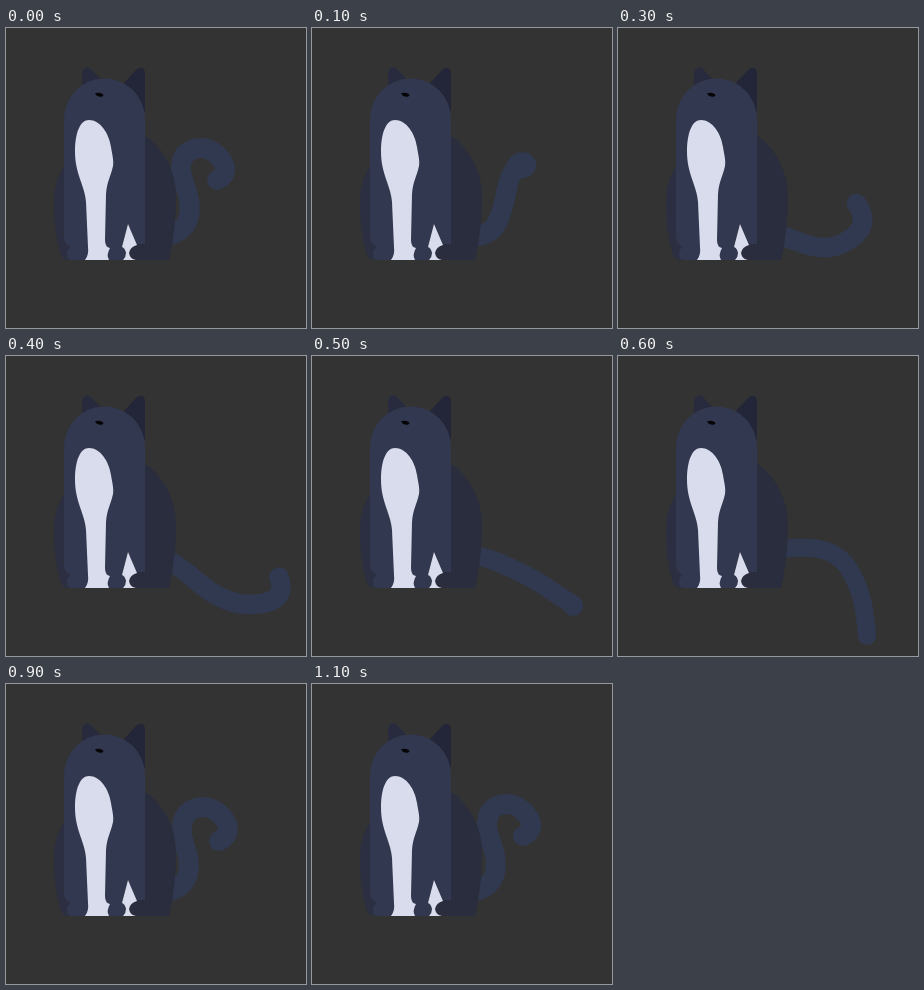
Write an HTML page without scripts that moves like this. It is 300x300 px and loops after 1300 ms.

```html
<!DOCTYPE html>
<html lang="en">
<head>
<meta charset="utf-8">
<title>Cat swishing its tail</title>
<style>
  html, body { margin: 0; width: 100%; height: 100%; overflow: hidden; background: #333; }
  svg { display: block; width: 100%; height: 100%; }
  .coat { fill: #32384f; }
  .shade { fill: #2a2d3d; }
  .white { fill: #d9dcec; }
  .tail {
    fill: none;
    stroke: #303950;
    stroke-width: 20px;
    stroke-linecap: round;
    stroke-linejoin: round;
    animation: swish 1300ms infinite;
  }
  /* Each pose moves on at ten pictures a second. */
  @keyframes swish {
    0% {
      d: path("M164 207C180 203 186 190 183 172C180 156 174 150 175 138C176 124 187 120 195 120C209 119 231 143 211 152");
      animation-timing-function: steps(2);
    }
    15.3846% {
      d: path("M160 210C172 211 182 211 191 208C203 204 211 194 215 182C218 172 219 162 217 152C215 143 210 134 204 130");
      animation-timing-function: steps(2);
    }
    30.7692% {
      d: path("M162 204C173 210 184 219 193 227C206 238 220 246 236 248C250 249 264 248 271 241C277 235 275 227 273 221");
      stroke-width: 19.5px;
      animation-timing-function: steps(2);
    }
    46.1538% {
      d: path("M160 193C172 192 183 191 193 192C209 193 222 199 231 213C240 228 244 241 246 253C247 263 249 273 249 280");
      stroke-width: 18px;
      animation-timing-function: steps(1);
    }
    53.8462% {
      d: path("M162 206C172 203 175 196 181 190C190 177 207 163 226 162C243 161 255 166 264 177C269 184 272 192 272 197");
      stroke-width: 20px;
      animation-timing-function: steps(2);
    }
    69.2308% {
      d: path("M164 207C180 203 185 190 182 173C179 160 174 152 176 141C178 128 188 123 197 123C211 122 235 146 213 157");
      animation-timing-function: steps(2);
    }
    84.6154%, 100% {
      d: path("M164 207C180 203 186 190 183 172C180 156 174 150 175 138C176 124 187 120 195 120C209 119 231 143 211 152");
    }
  }
</style>
</head>
<body>
<svg viewBox="0 0 300 300" role="img" aria-label="Sitting cat with a swishing tail">
  <path class="tail" d="M164 207C180 203 186 190 183 172C180 156 174 150 175 138C176 124 187 120 195 120C209 119 231 143 211 152"/>

  <!-- haunches -->
  <path class="shade" d="M138 107C158 120 170 143 170 170C170 194 167 215 163 232H124V107Z"/>
  <path fill="#2b2f41" d="M60 136C51 147 48 160 48 176C48 198 51 217 56 229Q58 232 62 232H82V136Z"/>

  <!-- ears -->
  <path fill="#282b3e" d="M76 62V47C76 40 81 37 86 42L99 56Z"/>
  <path fill="#232538" d="M139 84V46C139 39 134 38 130 42L118 55Z"/>

  <!-- head, chest and legs -->
  <path class="coat" d="M58 91A40.5 40.5 0 0 1 139 91V216H131L122 196L116 219Q120 221 120 226Q120 232 114 232H66Q61 232 61 226Q61 221 65 219Q58 216 58 208Z"/>
  <path class="white" d="M83 92C94 92 103 105 105 119C106 126 108 132 107 138C105 148 101 153 100 166L99 212Q99 219 104 220Q100 227 103 232H79Q83 227 82 219L80 174C79 158 69 146 69 124C69 105 74 92 83 92Z"/>
  <path class="white" d="M122 196L131 217Q124 219 123 225Q124 231 130 232H117Q120 229 120 225Q119 220 116 219Z"/>

  <path fill="#050507" d="M89 65.5C92 64 97 64.8 97.5 67.5C95.5 69.8 91 69 89 65.5Z"/>
</svg>
</body>
</html>
```
